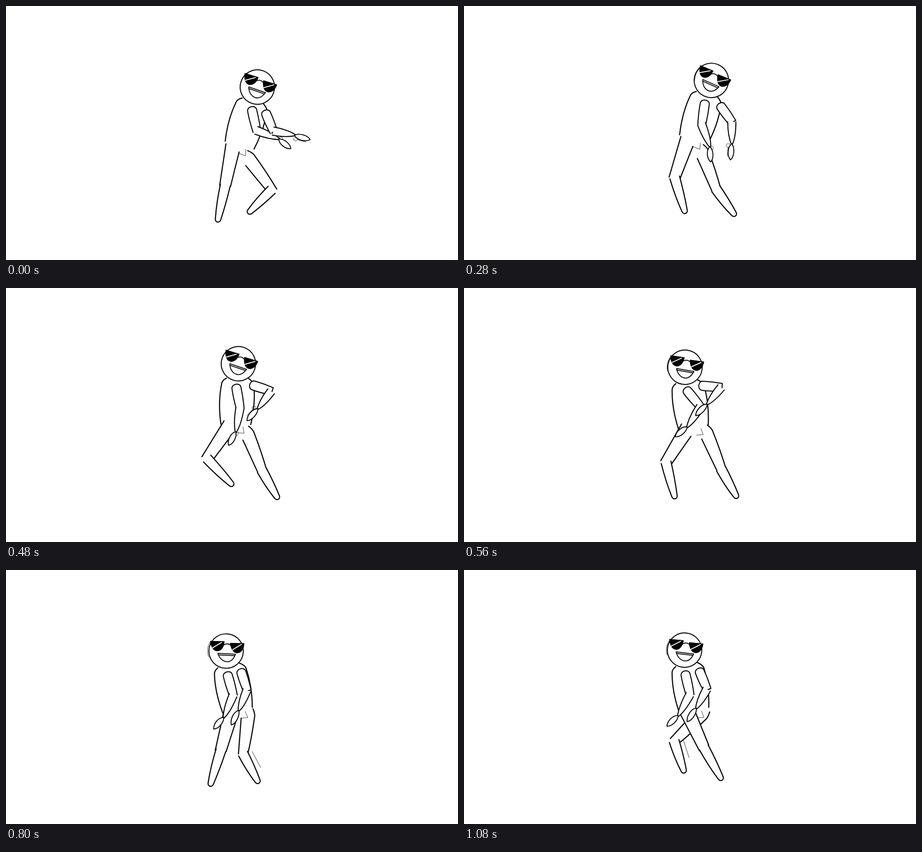
Recreate the animation shown at these times as an HTML page. Size 998 by 561 pixels, loop 1120 ms.

```html
<!DOCTYPE html>
<html lang="en">
<head>
<meta charset="utf-8">
<title>Dancing figure</title>
<style>
  html, body { margin: 0; width: 100%; height: 100%; overflow: hidden; background: #fff; }
  svg { display: block; width: 100vw; height: 100vh; }
  path { stroke: #0c0c0c; stroke-linejoin: round; stroke-linecap: round; }
  .thin { fill: none; stroke-width: 0.8; }
</style>
</head>
<body>
<svg id="stage" viewBox="0 0 998 561"></svg>
<script>
const LOOP = 1120, STEP = 40;
const stage = document.getElementById('stage');

// Key poses of a jointed figure; angles in degrees, 90 points straight down.
const BEATS = [0, 160, 400, 560, 800, 960, 1080];
const DANCE = {
  headX: [555, 547, 539, 488, 486, 491, 487],
  headY: [179, 171, 161, 175, 179, 173, 177],
  lean: [17, 17, 13, -8, -11, -7, -9],
  tilt: [19, 20, 26, 10, 3, 11, 7],
  nearThigh: [101, 96, 122, 122, 105, 68, 65],
  nearShin: [102, 122, 29, 76, 107, 66, 61],
  farThigh: [54, 65, 72, 68, 98, 133, 136],
  farShin: [135, 60, 60, 61, 62, 60, 72],
  nearArm: [78, 80, 109, 51, 75, 65, 78],
  nearForearm: [21, 65, 75, 123, 113, 124, 119],
  farArm: [68, 64, 41, 5, 73, 55, 68],
  farForearm: [11, 58, 117, 130, 112, 115, 119]
};

// Smooth curve through the unevenly spaced beats.
function sample(keys, t) {
  const last = BEATS.length - 1;
  let i = 0;
  while (i < last - 1 && t >= BEATS[i + 1]) i++;
  const span = BEATS[i + 1] - BEATS[i];
  const s = (t - BEATS[i]) / span;
  const slope = k => {
    const a = Math.max(0, k - 1), b = Math.min(last, k + 1);
    return (keys[b] - keys[a]) / (BEATS[b] - BEATS[a]);
  };
  return keys[i] + (keys[i + 1] - keys[i]) * s * s * (3 - 2 * s)
    + span * s * (1 - s) * ((1 - s) * slope(i) - s * slope(i + 1));
}

function add(parent, tag, attrs = {}) {
  const node = document.createElementNS('http://www.w3.org/2000/svg', tag);
  for (const name in attrs) node.setAttribute(name, attrs[name]);
  return parent.appendChild(node);
}

function polar([x, y], angle, distance) {
  const a = angle * Math.PI / 180;
  return [x + distance * Math.cos(a), y + distance * Math.sin(a)];
}

function place(node, [x, y], angle) {
  node.setAttribute('transform', `translate(${x} ${y}) rotate(${angle})`);
}

// Every part lies along its own x axis, starting at its joint.
function part(length, line, { width = 2.3, fill = line } = {}) {
  const node = add(stage, 'g');
  add(node, 'path', { d: fill, fill: '#fff', style: 'stroke:none' });
  add(node, 'path', { d: line, fill: 'none', 'stroke-width': width });
  return {
    node, length,
    pose(joint, angle) {
      place(node, joint, angle);
      return polar(joint, angle, length);
    }
  };
}

const shin = l => part(l,
  `M0 11Q${l / 2} 11 ${l - 6} 6C${l + 2} 5 ${l + 2} -5 ${l - 6} -6Q${l / 2} -10 0 -11`, { width: 2.5 });
const upperArm = (l, elbow) => part(l,
  `M${l + 3} 8Q${l / 2} 11 8 10C-2 9 -2 -9 8 -10Q${l * 0.6} -11 ${l + 2} -9${elbow}`);
const forearm = l => part(l, `M0 9Q${l * 0.6} 9 ${l} 0Q${l * 0.7} -9 0 -9`);
const hand = l => part(l, `M0 0C${l * 0.2} 8 ${l * 0.7} 9 ${l} 0C${l * 0.8} -8 ${l * 0.25} -8 0 0Z`, { width: 2.1 });
const guide = d => add(stage, 'path', { d, class: 'thin' });
const wristGuide = () => guide('M4 0A4 4 0 1 0 -4 0A4 4 0 1 0 4 0L24 0');

const torso = part(93,
  'M-9 25Q-4 34 3 35C33 40 65 38 93 33M91 -33C65 -38 33 -40 3 -36Q-4 -34 -11 -23',
  { width: 2.5, fill: 'M-9 25Q-4 34 3 35C33 40 65 38 93 33L91 -33C65 -38 33 -40 3 -36Q-4 -34 -11 -23Z' });
const shinGuide = guide('M5 -20L45 -20');
const farLeg = [
  part(96, 'M19 15L98 10M101 -10Q58 -14 10 -14Q3 -13 -5 -8',
    { width: 2.5, fill: 'M19 15L98 10L101 -10Q58 -14 10 -14Q3 -13 -5 -8Z' }),
  shin(74)
];
const hipGuide = guide('M17 -4L18 -19L4 -16');
const nearLeg = [
  part(86, 'M-4 16Q43 14 89 12M8 -16Q43 -14 86 -12',
    { width: 2.5, fill: 'M-4 16Q43 14 89 12L86 -12Q43 -14 8 -16Z' }),
  shin(83)
];
const nearWrist = wristGuide();
const nearArm = [upperArm(54, ''), forearm(57), hand(34)];
const farWrist = wristGuide();
const farArm = [upperArm(50, 'l0 12'), forearm(52), hand(36)];

const head = add(stage, 'g', { fill: 'none', 'stroke-width': 2 });
add(head, 'circle', { r: 38, fill: '#fff', stroke: '#0c0c0c', 'stroke-width': 2.2 });
const rim = add(head, 'path', { d: 'M-33 -19A38 38 0 0 0 -35 15', class: 'thin' });
add(head, 'path', { d: 'M-18 6L21 6C17 18 10 23.5 3 23.5C-6 23.5 -14 17 -18 6ZM-17 9.3L19.5 9.3' });
add(head, 'path', { d: 'M-6 -13Q2 -19 10 -13' });
for (const side of [0, 1]) {
  const lens = add(head, 'g', { transform: `translate(${44 * side} ${2 * side})` });
  add(lens, 'path', { d: 'M-36 -20L-5 -21C-5 -7 -12 1 -20 1C-28 1 -34 -8 -36 -20Z', fill: '#000', 'stroke-width': 1 });
  add(lens, 'path', { d: 'M-30 -5.5L-11 -18.5', style: 'stroke:#fff' });
}

function poseArm([upper, lower, palm], shoulder, a, b, bend) {
  const elbow = upper.pose(shoulder, a);
  const wrist = lower.pose(elbow, b);
  palm.pose(polar(wrist, b, -4), b + bend);
  return wrist;
}

function poseLeg([thigh, calf], hip, a, b) {
  const knee = thigh.pose(hip, a);
  calf.pose(knee, b);
  return knee;
}

function show(node, visible) {
  node.setAttribute('visibility', visible ? 'visible' : 'hidden');
}

function draw(t) {
  const p = {};
  for (const name in DANCE) p[name] = sample(DANCE[name], t);
  const spine = 90 + p.lean;
  const skull = [p.headX, p.headY];
  const chest = polar(skull, spine, 42);
  const pelvis = torso.pose(chest, spine);

  place(head, skull, p.tilt);
  rim.setAttribute('transform', `translate(${(p.tilt - 18) * 0.2} 0)`);

  const farHip = polar(pelvis, 20 + 2 * p.lean, 25);
  const farKnee = poseLeg(farLeg, farHip, p.farThigh, p.farShin);
  poseLeg(nearLeg, [pelvis[0] - 15, pelvis[1] + 3.5], p.nearThigh, p.nearShin);

  const shoulder = (across, down) => polar(polar(chest, p.lean, across), spine, down);
  const wristA = poseArm(nearArm, shoulder(-4.5 + p.lean / 4, 3), p.nearArm, p.nearForearm, 18);
  const wristB = poseArm(farArm, shoulder(26 + p.lean / 4, 2), p.farArm, p.farForearm, 5);

  place(hipGuide, pelvis, spine);
  place(shinGuide, farKnee, p.farShin);
  place(nearWrist, polar(wristA, p.nearForearm - 90, 2), p.nearForearm + 18);
  place(farWrist, polar(wristB, p.farForearm + 90, 8), p.farForearm + 5);
  show(shinGuide, p.farThigh > 95);
  show(nearWrist, p.lean > 0);
  show(farWrist, p.lean > 0);
}

let start = null;
function tick(now) {
  if (start === null) start = now;
  draw(Math.floor((now - start) % LOOP / STEP) * STEP);
  requestAnimationFrame(tick);
}
draw(0);
requestAnimationFrame(tick);
</script>
</body>
</html>
```
